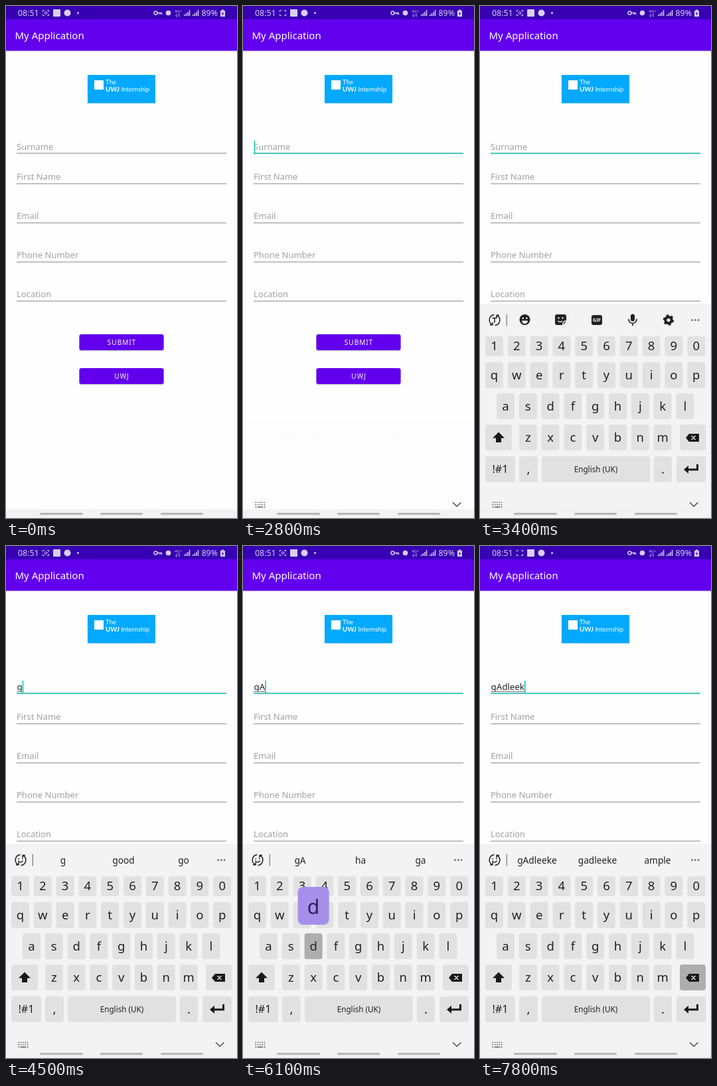
Write an HTML page that moves like this. It is 348x772 px and loops after 8000 ms.

```html
<!DOCTYPE html>
<html lang="en">
<head>
<meta charset="utf-8">
<title>Sign-up form</title>
<style>
html, body { margin: 0; width: 100%; height: 100%; overflow: hidden; background: #fefefe; }
svg { display: block; width: 100vw; height: 100vh; }
text { font-family: "Noto Sans", "Open Sans", sans-serif; white-space: pre; }
.mid { text-anchor: middle; }
.logo { font: 9.7px Lato, sans-serif; fill: #fff; }
.btn { font-size: 10px; letter-spacing: 1px; fill: #fff; text-anchor: middle; }
.line { fill: none; stroke-linecap: round; stroke-linejoin: round; }
</style>
</head>
<body>
<svg id="stage" viewBox="0 0 348 772" preserveAspectRatio="none">
  <rect width="348" height="772" fill="#fefefe"/>
  <rect width="348" height="68.500" fill="#e4e0ee"/>
  <rect width="348" height="67.500" fill="#6200ee"/>
  <rect width="348" height="20" fill="#3700b3"/>

  <g fill="#d9cff2" font-size="12.400">
    <text x="18" y="15.200">08:51</text>
    <g class="line" stroke="#d9cff2">
      <path d="M55.500 8.500v-2h2M62.500 6.500h2v2M64.500 12.500v2h-2M57.500 14.500h-2v-2"/>
      <circle id="rec" cx="60" cy="10.500" r="1.800"/>
      <circle cx="225.500" cy="10.500" r="2.500" stroke-width="1.400"/>
      <path d="M228 10.500h6.500v2M232 10.500v1.800" stroke-width="1.400"/>
      <path d="M257 12v4m-1.500-1.500l1.500 1.500M261 16v-4m-1.500 1.500l1.500-1.500" stroke-width=".8"/>
    </g>
    <rect x="71" y="5" width="11" height="11" rx="1"/>
    <circle cx="92.500" cy="10.500" r="5"/>
    <circle cx="108.500" cy="10.500" r="1.500"/>
    <circle cx="244.500" cy="10.500" r="3.800"/>
    <text x="254.500" y="10" font-size="5.500">4G+</text>
    <path id="bars" d="M268 15v-2h1.500v2zm2.600 0v-4h1.500v4zm2.600 0V9h1.500v6zm2.600 0V6h1.500v9z"/>
    <use href="#bars" x="13"/>
    <text x="294.500" y="15.200">89%</text>
    <path d="M323 7h2V5.500h3V7h2v9h-7z"/>
    <path d="M327.200 8l-2.500 4h1.800l-.7 3 2.600-4h-1.800z" fill="#3700b3"/>
  </g>
  <text x="13.500" y="50" font-size="15" fill="#fff">My Application</text>

  <rect x="122.500" y="103.500" width="103" height="44" fill="#dceefa"/>
  <rect x="123" y="104" width="102" height="42.500" fill="#03a9fc"/>
  <rect x="133" y="112" width="14" height="14" fill="#fff"/>
  <text class="logo" x="150" y="118">The</text>
  <text class="logo" x="150" y="128.500"><tspan font-weight="700">UWJ</tspan> Internship</text>

  <g id="fields" font-size="13" fill="#a0a0a0"></g>
  <rect id="focus" x="16" y="221.500" width="316" height="1.700" fill="#30cabf"/>
  <text id="typed" x="16.500" y="217" font-size="13.300" fill="#222"></text>
  <rect id="under" x="16.500" y="219" height="1" fill="#777"/>
  <rect id="caret" y="203" width="1.700" height="19" fill="#20cbbc"/>

  <g id="buttons"></g>

  <g id="board">
    <rect y="449" width="348" height="323" fill="#f3f3f3"/>
    <g class="line" stroke="#222" stroke-width="1.500">
      <path id="turn" d="M18.500 480.500a8 8 0 0 1 2.500-15M15.500 480.800h3.500v-3.500"/>
      <use href="#turn" transform="rotate(180 22 473.500)"/>
      <path id="tee" d="M19 470.500h6M22 470.500v6.500"/>
      <path id="smile" d="M19.300 471.500v.6M24.700 471.500v.6M18.800 475q3.200 3.500 6.400 0"/>
      <path d="M40.300 465v17" stroke="#777" stroke-width="1.200"/>
    </g>
    <g id="tools" fill="#222">
      <circle cx="67.500" cy="473" r="8"/>
      <path d="M116 465h11q3 0 3 3v6q-6 0-6 7h-8q-3 0-3-3v-10q0-3 3-3zM125.500 480.500q0-4.500 4.500-5z"/>
      <g fill="#f3f3f3">
        <circle cx="64.700" cy="470.800" r="1.300"/><circle cx="70.300" cy="470.800" r="1.300"/>
        <path d="M63 474.500h9a4.500 4.500 0 0 1-9 0z"/>
        <circle cx="118.500" cy="470.500" r="1.200"/><circle cx="124.500" cy="470.500" r="1.200"/>
      </g>
      <path class="line" d="M118 475q3 3 5.500 0" stroke="#f3f3f3" stroke-width="1.400"/>
      <rect x="168" y="466" width="16" height="15" rx="3"/>
      <text class="mid" x="176" y="476.300" font-size="7.500" font-weight="700" fill="#f3f3f3">GIF</text>
      <rect x="227" y="464.500" width="6" height="11" rx="3"/>
      <path class="line" d="M224 472.500a6 6 0 0 0 12 0M230 478.500v3" stroke="#222" stroke-width="1.700"/>
      <g fill="none" stroke="#222">
        <circle cx="284" cy="473.500" r="4.600" stroke-width="4"/>
        <circle cx="284" cy="473.500" r="7" stroke-width="2.400" stroke-dasharray="3.665"/>
      </g>
    </g>
    <g id="words" class="mid" font-size="13.700"></g>
    <path class="line" d="M319.500 473.500h.01M324.300 473.500h.01M329.100 473.500h.01" stroke="#777" stroke-width="3"/>
    <g id="keys" class="mid" fill="#222"></g>
    <g fill="#181818">
      <path d="M28 642.500l9 9h-5v6.500h-8v-6.500h-5z"/>
      <path d="M310 651l5-6h15v12h-15z"/>
      <path class="line" d="M319 648.500l5 5m0-5l-5 5" stroke="#e1e1e1" stroke-width="1.600"/>
      <path d="M307 699l7-6v4.500h12V691h3v9.500h-15v4.500z"/>
    </g>
    <g id="pops" class="mid" font-size="30" fill="#2b2150"></g>
  </g>

  <rect id="nav" y="759" width="348" height="13" fill="#f2f2f2"/>
  <path class="line" d="M52.500 765.800h62M143.500 765.800h61M234.500 765.800h61" stroke="#b4b4b4" stroke-width="3"/>
  <g id="imeNav" class="line" stroke="#555">
    <path d="M18.500 748.500h15M18.500 752h15" stroke-dasharray="1.500 1.800" stroke-linecap="butt" stroke-width="1.600"/>
    <path d="M18.500 755.500h2M22 755.500h8M31.500 755.500h2" stroke-linecap="butt" stroke-width="1.600"/>
    <path d="M316.500 749l5.700 5.500 5.700-5.500" stroke-width="1.700"/>
  </g>
</svg>

<script>
const LOOP = 8000, FOCUS = 2500, CARET = 2550;
const KEY = '#e1e1e1', DOWN = '#aeaeae';
const $ = id => document.getElementById(id);

function add(parent, tag, attrs, text) {
  const el = document.createElementNS('http://www.w3.org/2000/svg', tag);
  for (const k in attrs) el.setAttribute(k, attrs[k]);
  if (text) el.textContent = text;
  parent.append(el);
  return el;
}
const show = (el, on) => el.setAttribute('visibility', on ? 'visible' : 'hidden');

// Form
const hints = [['Surname', 222], ['First Name', 268], ['Email', 327], ['Phone Number', 386], ['Location', 445]]
  .map(([name, y], i) => {
    add($('fields'), 'rect', { x: 16, y: y - .5, width: 316, height: 1, fill: '#858585' });
    return add($('fields'), 'text', { x: 16, y: y - (i ? 6 : 5) }, name);
  });
[['SUBMIT', 495], ['UWJ', 546]].forEach(([name, y]) => {
  add($('buttons'), 'rect', { x: 110, y: y + 1.5, width: 128, height: 24, rx: 3, fill: '#ccc' });
  add($('buttons'), 'rect', { x: 110.5, y, width: 127, height: 24, rx: 3, fill: '#6200ee' });
  add($('buttons'), 'text', { class: 'btn', x: 174.5, y: y + 15.6 }, name);
});

// Keyboard
const keys = {};
function addKey(id, x, y, w, h, label, size = 18.5) {
  const rect = add($('keys'), 'rect', { x, y, width: w, height: h, rx: 4, fill: KEY });
  const cx = x + w / 2;
  const text = label && add($('keys'), 'text', { x: cx, y: y + h / 2 + size * .35, 'font-size': size }, label);
  keys[id] = { rect, text };
  if (/^[a-z]$/.test(id)) {
    const pop = add($('pops'), 'g', {});
    add(pop, 'rect', { x: cx - 23.5, y: y - 70, width: 47, height: 57, rx: 8, fill: '#a58fea' });
    keys[id].pop = pop;
    keys[id].popText = add(pop, 'text', { x: cx, y: y - 29 }, id);
  }
}
[['1234567890', 8, 498, 30], ['qwertyuiop', 8, 537, 39], ['asdfghjkl', 25, 584, 39], ['zxcvbnm', 58.8, 631, 39]]
  .forEach(([row, x, y, h]) => [...row].forEach((c, i) => addKey(c, x + i * 33.8, y, 27, h, c)));
addKey('shift', 8, 631, 40, 39);
addKey('back', 301, 631, 39, 39);
addKey('sym', 8, 679, 45, 39, '!#1', 16.3);
addKey(',', 59, 679, 28, 39, ',');
addKey('space', 93, 679, 163, 39, 'English (UK)', 11.7);
addKey('.', 262, 679, 27, 39, '.');
addKey('enter', 296, 679, 44, 39);
const words = [86, 177, 267.5].map(x => add($('words'), 'text', { x, y: 479 }));

// Timeline, in ms
const typing = [[0, ''], [4300, 'g'], [5000, 'gy'], [5300, 'g'], [5900, 'gA'], [6200, 'gAd'], [6400, 'gAdl'],
  [6600, 'gAdle'], [6800, 'gAdlee'], [6900, 'gAdleek'], [7200, 'gAdleeke'], [7600, 'gAdleek']];
// A star marks the autocorrect choice
const guesses = [[0, ''], [4400, 'g good go'], [5200, 'gy by* gym'], [5600, 'g good go'], [6000, 'gA ha ga'],
  [6400, 'gAd had* gas'], [7000, 'gAdlee gale* able'], [7400, 'gAdleeke gadleeke ample']];
const presses = [['g', 4150, 4350], ['y', 4900, 5080], ['back', 5200, 5350], ['shift', 5560, 5680],
  ['a', 5800, 5980], ['d', 6100, 6270], ['l', 6330, 6480], ['e', 6490, 6780], ['k', 6680, 6880],
  ['e', 7100, 7280], ['back', 7500, LOOP]];
const latest = (list, t) => list.findLast(e => e[0] <= t);

function draw(t) {
  show($('rec'), Math.max(t - 50, 0) % 1000 < 550);
  show($('focus'), t >= FOCUS);
  show($('imeNav'), t >= 2700);

  const [editAt, value] = latest(typing, t);
  $('typed').textContent = value;
  const width = value ? $('typed').getComputedTextLength() : 0;
  $('under').setAttribute('width', width);
  $('caret').setAttribute('x', 16.5 + width);
  show($('caret'), t >= CARET && (t - (editAt || CARET)) % 1000 < 500);
  show(hints[0], !value);

  const p = Math.min(Math.max((t - 2800) / 400, 0), 1), rise = 1 - (1 - p) ** 3;
  $('board').setAttribute('transform', `translate(0 ${(1 - rise) * 180})`);
  $('board').setAttribute('opacity', p);
  show($('board'), p > 0);

  const guess = latest(guesses, t)[1].split(' ');
  const guessing = guess.length > 1;
  words.forEach((el, i) => {
    const word = guess[i] || '';
    el.textContent = word.replace('*', '');
    el.setAttribute('fill', word.endsWith('*') ? '#7e57b5' : '#222');
  });
  $('tools').style.display = guessing ? 'none' : '';
  $('tee').style.display = guessing ? 'none' : '';
  $('smile').style.display = guessing ? '' : 'none';

  const upper = t >= 5650 && t < 5950;
  for (const id in keys) {
    const { rect, text, pop, popText } = keys[id];
    const down = presses.some(([k, a, b]) => k == id && t >= a && t < b);
    rect.setAttribute('fill', down ? DOWN : KEY);
    if (!pop) continue;
    text.textContent = popText.textContent = upper ? id.toUpperCase() : id;
    pop.style.display = down ? '' : 'none';
  }
}

const start = performance.now();
function tick() {
  draw((performance.now() - start) % LOOP);
  requestAnimationFrame(tick);
}
tick();
</script>
</body>
</html>
```
